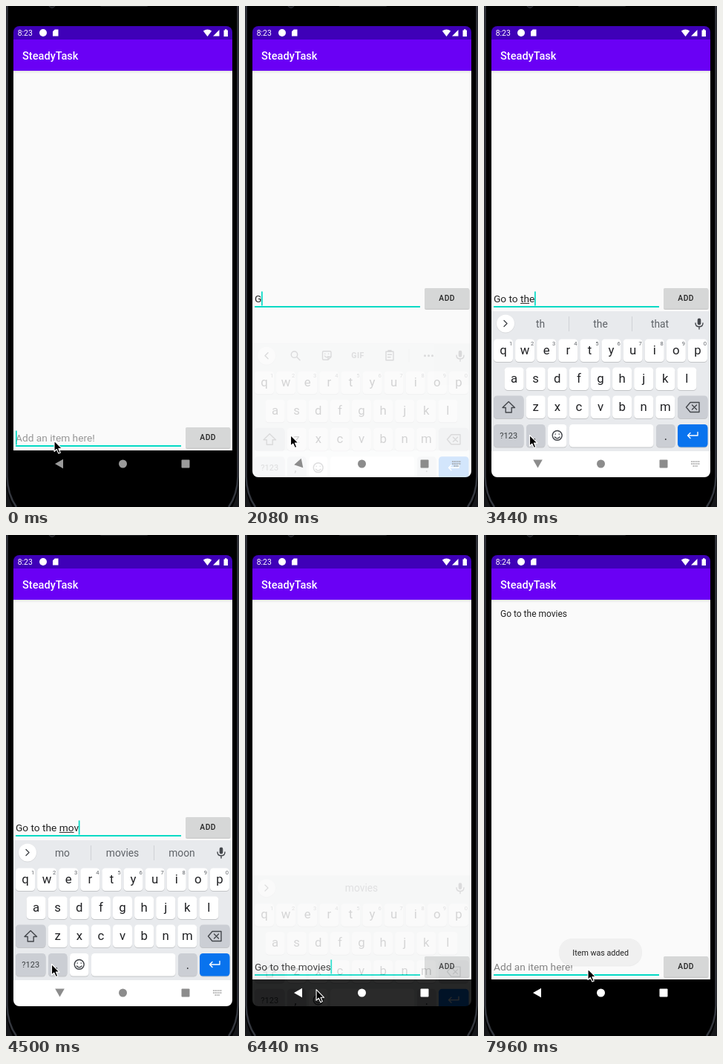
Animation of 314 by 673 pixels, one loop 8000 ms. Source, as an HTML page:

```html
<!DOCTYPE html>
<html lang="en">
<head>
<meta charset="utf-8">
<title>Todo list demo</title>
<style>
html, body { margin: 0; width: 100%; height: 100%; overflow: hidden; background: #000; }
svg { display: block; width: 314px; height: 673px; }
text { font-family: Roboto, sans-serif; white-space: pre; }
.mid { text-anchor: middle; }
.med { font-weight: 500; }
.line { fill: none; stroke: #44474c; stroke-width: 1.4; stroke-linecap: round; stroke-linejoin: round; }
</style>
</head>
<body>
<svg viewBox="0 0 314 673" xmlns="http://www.w3.org/2000/svg">
  <defs>
    <clipPath id="screen"><rect x="10" y="27" width="295" height="606" rx="8"/></clipPath>
    <linearGradient id="shade" x1="0" y1="0" x2="0" y2="1">
      <stop offset="0" stop-color="#000" stop-opacity=".09"/>
      <stop offset="1" stop-color="#000" stop-opacity="0"/>
    </linearGradient>
  </defs>

  <!-- device -->
  <rect width="314" height="673"/>
  <path d="M1.500 0V632Q2 656 14 673M312.500 0V632Q312 656 300 673" fill="none" stroke="#34373e" stroke-width="2.500"/>
  <path d="M0 640Q2 660 9 673H0ZM314 640Q312 660 305 673H314Z" fill="#16171a"/>
  <circle cx="62" cy="-2" r="4.500" fill="#17181b" stroke="#303238"/>
  <rect x="126" y="-6" width="66" height="7" rx="3" fill="#232427"/>

  <g clip-path="url(#screen)">
    <rect x="10" y="87" width="295" height="510" fill="#fafafa"/>
    <rect x="10" y="27" width="295" height="18" fill="#3f00b8"/>
    <rect x="10" y="45" width="295" height="42" fill="#6a00f5"/>
    <rect x="10" y="87" width="295" height="4" fill="url(#shade)"/>
    <text class="med" x="22" y="72" font-size="14.600" fill="#fff">SteadyTask</text>
    <g fill="#fff">
      <text id="clock" x="15.700" y="39.800" font-size="10.400"></text>
      <circle cx="50" cy="36" r="5"/>
      <path d="M65.800 31.500H70.500V40.500H63V34.300Z"/>
      <path d="M271.500 41L265.800 33.500Q271.500 29.300 277.200 33.500Z"/>
      <path d="M279 40.500L287.500 32V40.500Z"/>
      <path d="M293.500 32.500H295V31.300H297.500V32.500H299V41H293.500Z"/>
    </g>
    <text id="item" x="22" y="109.700" font-size="12" fill="#222">Go to the movies</text>

    <g id="form">
      <text id="hint" x="13" y="585" font-size="13.700">Add an item here!</text>
      <text id="typed" x="13" y="585" font-size="13.700" fill="#222"></text>
      <path id="under" stroke="#333" stroke-width="1"/>
      <rect x="13" y="590" width="223" height="2" fill="#03dac5"/>
      <rect id="caret" y="570.500" width="1.700" height="19" fill="#03dac5"/>
      <rect x="242" y="567" width="60.500" height="28" rx="2" fill="#000" opacity=".18"/>
      <rect id="button" x="242" y="566" width="60" height="27.500" rx="1.500"/>
      <text class="mid med" x="272.200" y="583.200" font-size="10.300" letter-spacing=".5" fill="#222">ADD</text>
    </g>

    <rect id="navbar" x="10" y="597" width="295" height="36"/>
    <g id="ime">
      <rect x="10" y="410" width="295" height="188" fill="#e8eaed"/>
      <g id="keys"></g>
      <circle cx="29" cy="427" r="12.500" fill="#000" opacity=".07"/>
      <circle cx="29" cy="426.500" r="12" fill="#fff"/>
      <path id="chevron" class="line"/>
      <g fill="#44474c">
        <rect x="287.700" y="419.500" width="4.600" height="9" rx="2.300"/>
        <path class="line" d="M285 426Q285 430.800 290 430.800T295 426M290 431V434"/>
      </g>
      <g id="tools">
        <circle class="line" cx="66.500" cy="425" r="4.200"/>
        <path class="line" d="M69.800 428.300L74 432.500"/>
        <path class="line" d="M106 420.500H114.500Q116 420.500 116 422V428L112 432H106Q104.500 432 104.500 430.500V422Q104.500 420.500 106 420.500M116 428H112V432M107.500 427Q109.500 430 112 427.500M107.800 424V424.200M112.500 424V424.200"/>
        <text class="mid" x="152" y="429.800" font-size="10.500" font-weight="700" letter-spacing=".5" fill="#55585d">GIF</text>
        <path class="line" d="M190 421H200V432.500H190ZM193 421V419.500H197V421M192.500 425H197.500M192.500 428.500H196"/>
        <path d="M221 418V435" stroke="#d0d2d6"/>
        <g fill="#44474c"><circle cx="242.500" cy="426.500" r="1.500"/><circle cx="247.500" cy="426.500" r="1.500"/><circle cx="252.500" cy="426.500" r="1.500"/></g>
      </g>
      <g id="words" font-size="13.800" fill="#5f6368">
        <path id="bars" d="M114.500 417V437M199.500 417V437" stroke="#d0d2d6"/>
        <text class="mid" x="76" y="431.500"></text>
        <text class="mid" x="157" y="431.500"></text>
        <text class="mid" x="237" y="431.500"></text>
      </g>
    </g>
    <g id="nav">
      <path id="back" d="M66 615L77 608.700V621.300Z"/>
      <circle cx="157.500" cy="615" r="5.500"/>
      <rect x="236.500" y="609.500" width="11" height="11" rx="1"/>
    </g>
    <path id="switcher" d="M279 612H291M279 615H291M281.500 618H288.500" stroke="#999" stroke-width="1.600" stroke-dasharray="1.500 .8"/>
  </g>

  <g id="toast">
    <rect x="101" y="542.500" width="112" height="37" rx="18" opacity=".05"/>
    <rect x="101" y="542" width="112" height="36" rx="18" fill="#f0f0f0"/>
    <text class="mid" x="157.200" y="564.800" font-size="10.700" fill="#222">Item was added</text>
  </g>
  <path id="mouse" d="M0 0V14.500L3.300 11.500L5.800 17L8.300 15.900L5.900 10.600H10.500Z" fill="#000" stroke="#fff" stroke-width="1.100" stroke-linejoin="round"/>
</svg>

<script>
const LOOP = 8000, START = 1960, OPEN = 2060, CLOSE = 6260, DROP = 6320, ADDED = 7310;
const SLIDE = 57, SLIDE_MS = 200;
const $ = id => document.getElementById(id);
const set = (id, name, value) => $(id).setAttribute(name, value);
const show = (id, on) => set(id, 'opacity', +on);
const ramp = (t, from, to) => Math.min(1, Math.max(0, (t - from) / (to - from)));
const smooth = p => p * p * (3 - 2 * p);

// time, text, underline from, underline to, suggestions (these trail the text)
const typing = [
  [0, '', 0, 0, ''],
  [START, 'G', 0, 0, ''],
  [2480, 'Go', 0, 0, ''],
  [2720, 'Go', 0, 0, 'Go|Good|Got'],
  [2960, 'Go', 0, 2, 'Go|Good|Got'],
  [3020, 'Go ', 0, 0, 'to|ahead|for'],
  [3080, 'Go t', 0, 0, 'to|ahead|for'],
  [3150, 'Go to', 3, 4, 't|to|the'],
  [3220, 'Go to ', 0, 0, 'the|bed|sleep'],
  [3290, 'Go to t', 0, 0, 'the|bed|sleep'],
  [3370, 'Go to th', 6, 7, 't|the|to'],
  [3440, 'Go to the', 6, 8, 'th|the|that'],
  [3560, 'Go to the', 6, 9, 'th|the|that'],
  [3610, 'Go to the', 6, 9, 'the|they|then'],
  [3790, 'Go to the ', 0, 0, 'store|gym|movies'],
  [4030, 'Go to the m', 10, 11, 'm|movies|mall'],
  [4210, 'Go to the mo', 10, 11, 'm|movies|mall'],
  [4260, 'Go to the mo', 10, 12, 'mo|movies|moon'],
  [4500, 'Go to the mov', 10, 12, 'mo|movies|moon'],
  [4620, 'Go to the mov', 10, 13, 'mov|movie|movies'],
  [4850, 'Go to the movi', 10, 13, 'mov|movie|movies'],
  [4910, 'Go to the movi', 10, 14, 'movi|movie|movies'],
  [5030, 'Go to the movie', 10, 14, 'movi|movie|movies'],
  [5270, 'Go to the movies', 10, 15, 'movi|movie|movies'],
  [5330, 'Go to the movies', 10, 15, 'movie|movies|'],
  [5500, 'Go to the movies', 10, 16, '|movies|'],
  [CLOSE, 'Go to the movies', 0, 0, '|movies|'],
  [ADDED, '', 0, 0, '']
];
const route = [
  [0, 65, 584], [180, 65, 584], [240, 61, 583], [840, 61, 583], [960, 61, 582.5],
  [1130, 61, 582.5], [1190, 61.5, 576.5], [5450, 61.5, 576.5], [5500, 63, 573], [5680, 119, 490],
  [5820, 119, 490], [6080, 73, 624], [6320, 73, 624], [6860, 253, 520],
  [7120, 268, 576], [7400, 268, 576], [7840, 140, 583]
];
const caretOff = [[480, 960], [1490, START], [5850, 6320], [6920, ADDED], [7810, LOOP]];

const pen = document.createElement('canvas').getContext('2d');
pen.font = '13.7px Roboto, sans-serif';
const width = s => pen.measureText(s).width;

function buildKeys() {
  let out = '';
  const key = (x, y, w, fill = '#fff') => {
    out += `<rect x="${x}" y="${y + 1}" width="${w}" height="30.5" rx="4.5" opacity=".16"/>` +
      `<rect x="${x}" y="${y}" width="${w}" height="30.5" rx="4.5" fill="${fill}"/>`;
  };
  const label = (x, y, s, size, fill = '#202124') => {
    out += `<text class="mid" x="${x}" y="${y}" font-size="${size}" fill="${fill}">${s}</text>`;
  };
  const icon = (d, color = '#44474c') => { out += `<path class="line" d="${d}" style="stroke:${color}"/>`; };
  [['qwertyuiop', 26, 447.5], ['asdfghjkl', 40.6, 485.5], ['zxcvbnm', 69.7, 523.5]].forEach(([row, x0, y], r) => {
    [...row].forEach((c, i) => {
      const x = x0 + i * 29.1;
      key(x - 13, y, 26);
      label(x, y + 20, c, 16.8);
      if (!r) label(x + 10, y + 8.5, (i + 1) % 10, 7.5, '#5f6368');
    });
  });
  const grey = '#cbced4', side = 523.5, low = 562;
  key(13, side, 40.5, grey);
  key(261, side, 40.5, grey);
  key(13, low, 40.5, grey);
  key(57, low, 25.5, grey);
  key(86, low, 25.5);
  key(115, low, 113.5);
  key(232, low, 25.5, grey);
  key(261, low, 40.5, '#0873ee');
  label(33.2, 581, '?123', 11, '#3c4043');
  label(68, 583, ',', 15);
  label(244.8, 583, '.', 16);
  icon('M33.2 531.5L41.5 539.5H37.2V546H29.2V539.5H25Z');
  icon('M278 532.5H290V545.5H278L272.5 539ZM280.5 536L286.5 542M286.5 536L280.5 542');
  icon('M98.7 570.5A6.4 6.4 0 1 0 98.71 570.5M96.2 575V575.3M101.200 575V575.3M95.4 579Q98.7 582.8 102 579');
  icon('M288 572.5V577H274.5M278 573.5L274.5 577L278 580.5', '#fff');
  $('keys').innerHTML = out;
}

function drawText(t) {
  const [, text, from, to, sugs] = typing.findLast(s => s[0] <= t);
  const x = n => 13 + width(text.slice(0, n));
  $('typed').textContent = text;
  show('hint', !text);
  set('hint', 'fill', t >= 7960 ? '#838383' : '#979797');
  set('under', 'd', to > from ? `M${x(from)} 586.5H${x(to)}` : '');
  set('caret', 'x', Math.max(13, x(text.length) - .3));
  show('caret', !caretOff.some(([a, b]) => t >= a && t < b));
  show('tools', !sugs);
  show('words', !!sugs);
  show('bars', sugs[0] !== '|');
  const words = sugs.split('|');
  $('words').querySelectorAll('text').forEach((el, i) => { el.textContent = words[i] || ''; });
  set('chevron', 'd', sugs ? 'M27 422.5L31 426.5L27 430.5' : 'M31 422.5L27 426.5L31 430.5');
}

// The keyboard fades while it covers the last part of its way
function drawKeyboard(t) {
  const open = t >= OPEN && t < DROP;
  const away = t < CLOSE
    ? (1 - ramp(t, OPEN, OPEN + SLIDE_MS)) ** 2.5
    : ramp(t, CLOSE, CLOSE + SLIDE_MS) ** 1.8;
  set('ime', 'transform', `translate(0 ${SLIDE * away})`);
  show('ime', t < CLOSE ? ramp(t, OPEN, OPEN + 120) : 1 - away);
  set('form', 'transform', `translate(0 ${open ? -187 : 0})`);
  set('navbar', 'fill', open ? '#fff' : '#000');
  set('nav', 'fill', t >= DROP ? '#fff' : open ? '#8c8c8c' : '#9b9b9b');
  const turn = ramp(t, OPEN, OPEN + 160) - ramp(t, CLOSE, CLOSE + 160);
  set('back', 'transform', `rotate(${-90 * turn} 72 614.5)`);
  show('switcher', open);
}

function drawMouse(t) {
  let i = route.findIndex(p => p[0] > t);
  if (i < 0) i = route.length - 1;
  const [t0, x0, y0] = route[i - 1], [t1, x1, y1] = route[i];
  const p = smooth(ramp(t, t0, t1));
  set('mouse', 'transform', `translate(${x0 + (x1 - x0) * p} ${y0 + (y1 - y0) * p})`);
}

function draw(t) {
  drawText(t);
  drawKeyboard(t);
  drawMouse(t);
  $('clock').textContent = t < 7500 ? '8:23' : '8:24';
  show('item', t >= ADDED);
  show('toast', ramp(t, 7400, 7620));
  set('button', 'fill', t >= 7200 && t < 7440 ? '#c3c4c4' : '#d6d7d7');
}

buildKeys();
function tick() {
  draw(performance.now() % LOOP);
  requestAnimationFrame(tick);
}
tick();
</script>
</body>
</html>
```
